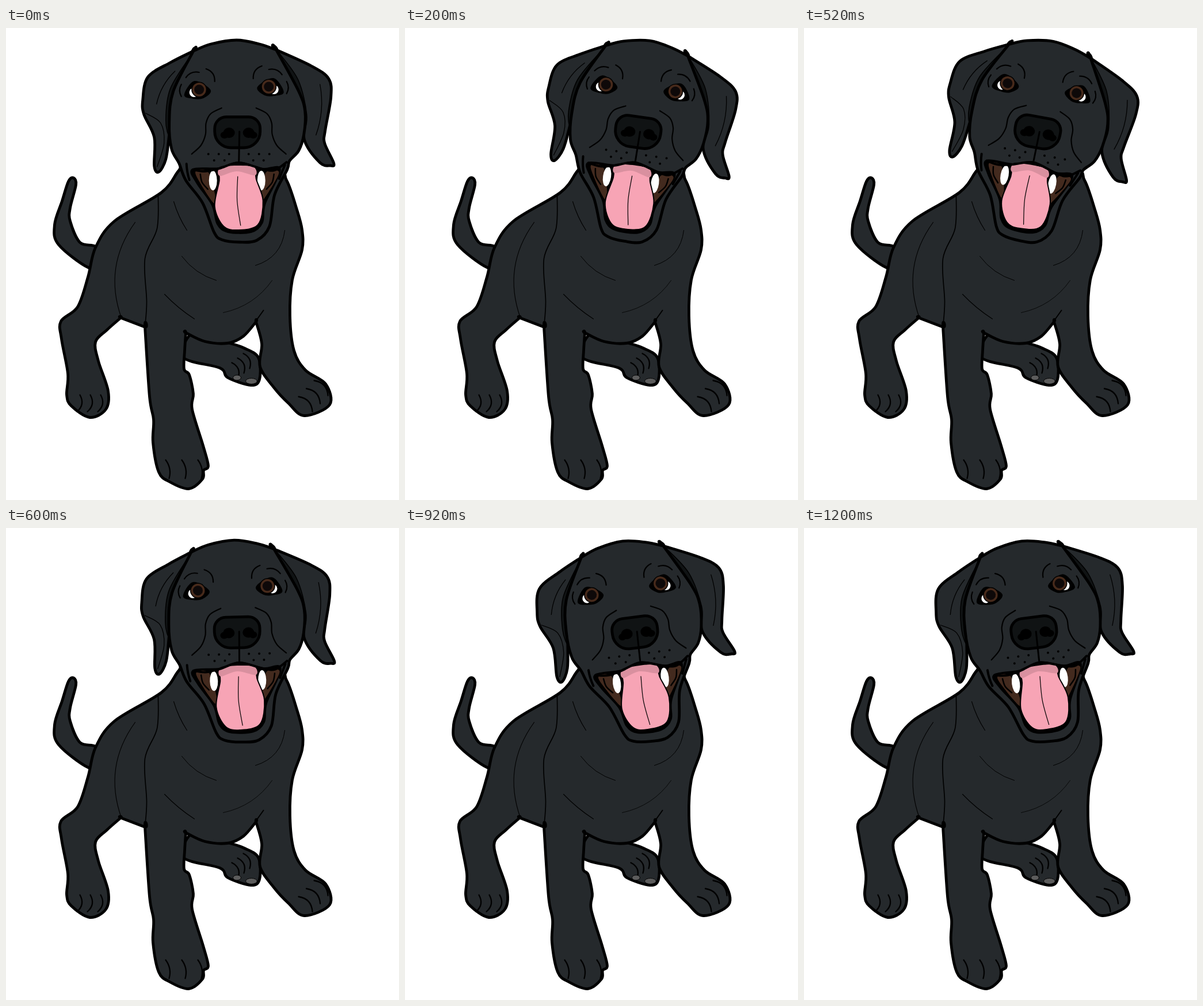
Write an HTML page with a canvas that moves like this. It is 683 px wide and 820 px high and loops after 1400 ms.

```html
<!DOCTYPE html>
<html lang="en">
<head>
<meta charset="utf-8">
<title>Puppy</title>
<style>
html, body { margin: 0; width: 100%; height: 100%; overflow: hidden; background: #fff; }
canvas { display: block; }
</style>
</head>
<body>
<canvas id="stage" width="683" height="820"></canvas>
<script>
const ctx = document.getElementById('stage').getContext('2d');
const COAT = '#25292c', INK = '#000', DARK = '#101314', BROWN = '#432a1e', PINK = '#f7a4b5', SHADE = '#d9909f';
const OUTLINE = 4.8;

// Smooth curve through "x,y x,y ..."; a repeated point makes a corner.
function curve(text, closed) {
  const p = text.trim().split(/\s+/).map(s => s.split(',').map(Number));
  const n = p.length;
  const at = i => closed ? p[(i + n) % n] : p[Math.max(0, Math.min(n - 1, i))];
  const path = new Path2D();
  path.moveTo(...p[0]);
  for (let i = 0; i < (closed ? n : n - 1); i++) {
    const [a, b, c, d] = [at(i - 1), at(i), at(i + 1), at(i + 2)];
    path.bezierCurveTo(
      b[0] + (c[0] - a[0]) / 6, b[1] + (c[1] - a[1]) / 6,
      c[0] - (d[0] - b[0]) / 6, c[1] - (d[1] - b[1]) / 6, c[0], c[1]);
  }
  if (closed) path.closePath();
  return path;
}

function paint(path, fill, width) {
  if (fill) { ctx.fillStyle = fill; ctx.fill(path); }
  if (width) { ctx.lineWidth = width; ctx.stroke(path); }
}
const shape = (text, fill, width) => paint(curve(text, true), fill, width);
const line = (text, width) => paint(curve(text), null, width);

function oval(x, y, rx, ry, fill, width) {
  const path = new Path2D();
  path.ellipse(x, y, rx, ry, 0, 0, Math.PI * 2);
  paint(path, fill, width);
}

// Crease starting at x,y and running dx,dy, bulging sideways by bow.
function crease(x, y, dx, dy, bow, width) {
  const k = 2 * bow / Math.hypot(dx, dy);
  const path = new Path2D();
  path.moveTo(x, y);
  path.quadraticCurveTo(x + dx / 2 - dy * k, y + dy / 2 + dx * k, x + dx, y + dy);
  paint(path, null, width);
}

function toes(count, x, y, stepX, stepY, dx, dy, bow) {
  for (let i = 0; i < count; i++) crease(x + i * stepX, y + i * stepY, dx, dy, bow, 2.3);
}

function place(x, y, side, part) {
  ctx.save();
  ctx.translate(x, y);
  ctx.scale(side, 1);
  part();
  ctx.restore();
}
const mirror = (x, part) => [1, -1].forEach(side => place(x, 0, side, part));

function tail() {
  shape(`117,260 108,266 97,300 84,341 91,376 146,417 165,400 155,379 128,372 111,335 111,312 121,272`,
    COAT, OUTLINE);
}

function backPaw() {
  shape('320,532 350,535 385,546 412,555 438,572 440,610 425,620 385,607 371,590 308,572', COAT, OUTLINE);
  toes(3, 392, 581, 10, -8, 11, 26, -6);
  oval(401, 607, 7, 4.5, '#5c5c5c', 1);
  oval(426, 613, 10, 5, '#5c5c5c', 1);
}

const flank = `320,232 300,247 270,285 188,335 155,381 142,432 124,484 95,509 96,540 107,600 105,637
  113,656 145,676 173,662 177,630 160,578 155,545 175,524 199,503 199,503 241,519 241,519 `;
const foreleg = `249,640 256,680 255,720 265,771 284,788 317,800 341,783 343,768 351,760 342,725
  323,662 325,635 318,602 309,592 310,560 312,529 312,529 `;
const chest = `345,544 385,547 412,535 434,510 434,510 444,548 441,588 465,624 490,651 518,673 562,654
  555,618 520,594 500,560 493,500 497,437 514,385 514,350 505,315 487,264 465,245`;

function body() {
  shape(flank + foreleg + chest, COAT, OUTLINE);
  line('264,290 262,348 241,400 244,475 241,519', 1.7);
  crease(224, 337, -24, 166, 22, 1.1);
  crease(291, 301, 23, 50, 2, 1.1);
  crease(305, 396, 60, 42, 6, 1);
  crease(275, 462, 52, 43, 2, 1.1);
  crease(484, 351, -51, 61, -13, 1);
  crease(462, 438, -85, 56, -10, 0.8);
  crease(447, 490, -15, 21, 0, 2);
  toes(3, 128, 637, 18, 0, -5, 29, -6);
  toes(3, 277, 750, 28, 0, 6, 32, -4);
  toes(3, 508, 640, 13.5, -14, 24, 26, -7);
}

function ears() {
  shape(`325,40 325,40 285,60 246,85 237,125 239,150 257,190 257,240 265,250 277,228 283,185 290,120`,
    COAT, OUTLINE);
  shape(`469,38 469,38 530,66 560,88 564,120 554,178 553,200 569,235 563,239 545,234 518,195 515,140`,
    COAT, OUTLINE);
  shape('323,44 323,44 291,110 284,184 277,160 285,105', DARK, 1.5);
  shape('472,41 472,41 514,150 517,180 522,150 507,90', DARK, 1.5);
  crease(293, 75, -32, 57, 5, 1.3);
  crease(545, 98, -7, 88, -6, 1.3);
  line('242,148 268,165 274,200 262,241', 1.3);
}

function face() {
  shape(`325,40 325,40 355,28 400,21 440,28 469,38 469,38 508,110 519,145 517,185 508,213 492,231
    488,246 466,290 457,345 435,369 405,372 375,368 361,355 341,304 312,265 300,235 287,210 283,165
    290,110`, COAT, OUTLINE);
}

function mouth() {
  shape(`324,246 370,244 404,234 445,245 475,246 449,305 444,338 425,354 385,354 367,340 358,307 331,268`,
    INK, 4);
  mirror(401, () => {
    shape('-72,249 -50,251 -38,292 -41,304 -65,268', BROWN);
    line('-64,254 -61,268 -51,280', 2.5);
    oval(-42, 265, 7, 17, '#fff');
  });
  shape('370,243 400,239 431,241 434,262 446,300 437,342 402,351 377,344 362,310 370,265', PINK, 2);
  shape('371,243 400,239 430,242 432,256 400,249 371,257', SHADE);
  line('402,258 401,300 407,343', 1.2);
  line('324,246 345,249 370,244 404,234 445,245 466,247 487,233', 4);
  crease(313, 236, 5, 28, 1, 4);
  crease(484, 238, -10, 24, 0, 4);
}

function muzzle() {
  const nose = new Path2D();
  nose.roundRect(362, 154.5, 79, 53.5, [20, 20, 28, 28]);
  paint(nose, DARK, OUTLINE);
  line('405,180 404,234', 3);
  mirror(404, () => {
    oval(17, 182, 10, 9, INK);
    oval(25, 186, 7, 6, INK);
    line('30,139 49,149 57,165 58,185 66,204 82,219', 2.2);
    for (let i = 0; i < 5; i++) {
      const row = i > 2 ? 1 : 0;
      oval(17 + 18 * (i % 3) + 8 * row, 219 + 11 * row, 2, 2, INK);
    }
  });
}

function eye() {
  shape('-25,9 -8,-14 19,1 7,14 -10,15', INK, 2);
  oval(-9, 5, 8, 8, '#fff');
  oval(0, 0, 13.5, 13.5, INK);
  oval(0, 0, 12, 12, '#472a1b');
  oval(0, 0, 8.5, 8.5, '#0e0909');
  crease(-23, -21, 23, -9, -4, 2.2);
  crease(12, -36, 15, 22, -5, 2.2);
  crease(-31, -9, 0, 21, 3, 2.2);
}

function head() {
  ears();
  face();
  mouth();
  muzzle();
  place(335, 107, 1, eye);
  place(456, 102, -1, eye);
}

const STEP = 200;
const tilts = [0, 8, 10.5, -1.4, -7.2, -11.1, -7.2];
const neck = { x: 404, y: 200 };

function render(time) {
  const tilt = tilts[Math.floor(time / STEP) % tilts.length];
  ctx.fillStyle = '#fff';
  ctx.fillRect(0, 0, 683, 820);
  ctx.strokeStyle = INK;
  ctx.lineCap = ctx.lineJoin = 'round';

  place(0.5, 0.5, 1, () => {
    tail();
    backPaw();
    body();
  });
  place(neck.x + 0.7, neck.y, 1, () => {
    ctx.rotate(tilt * Math.PI / 180);
    ctx.translate(-neck.x, -neck.y);
    head();
  });
}

let start;
function tick(now) {
  start ??= now;
  render(now - start);
  requestAnimationFrame(tick);
}
render(0);
requestAnimationFrame(tick);
</script>
</body>
</html>
```
